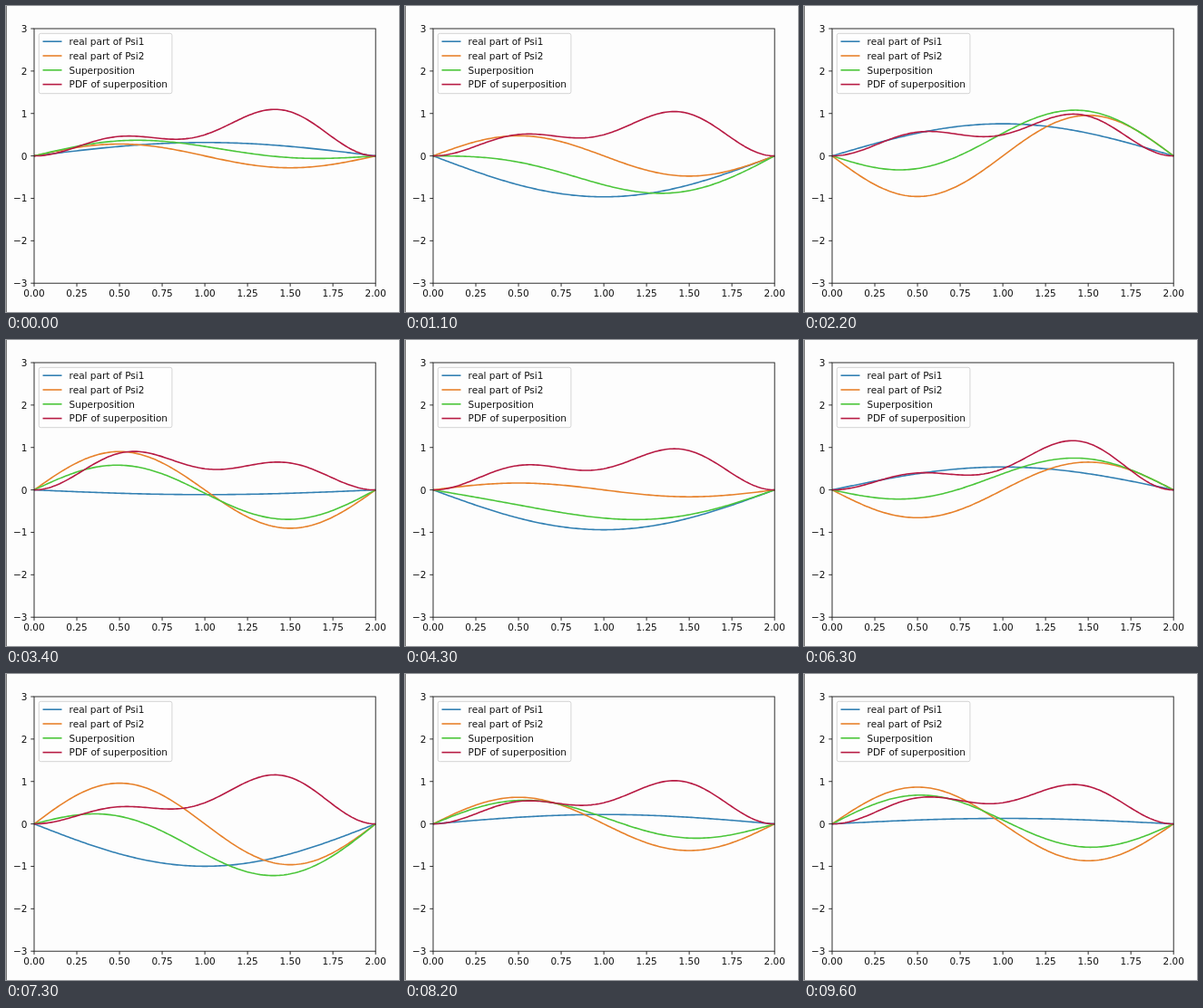
Write an HTML page that moves like this. It is 433 px wide and 338 px high and loops after 9.7 s.

```html
<!DOCTYPE html>
<html lang="en">
<head>
<meta charset="utf-8">
<title>Superposition in a box</title>
<style>
  html, body { margin: 0; width: 100%; height: 100%; overflow: hidden; background: #fdfdfd; }
  svg { display: block; width: 433px; height: 338px; }
  text { font: 10.5px "DejaVu Sans", sans-serif; fill: #111; }
  .curve { fill: none; stroke-width: 1.6; stroke-linejoin: round; }
  .axis { fill: none; stroke: #1a1a1a; stroke-width: 0.9; }
</style>
</head>
<body>
<svg id="stage" viewBox="0 0 433 338"></svg>
<script>
const LOOP = 9700, STEP = 100;
const LEFT = 31, RIGHT = 407.2, TOP = 25, BOTTOM = 306.2;
const stage = document.getElementById('stage');

const px = x => LEFT + x / 2 * (RIGHT - LEFT);
const py = y => BOTTOM - (y + 3) / 6 * (BOTTOM - TOP);

function add(tag, attrs, text) {
  const el = document.createElementNS('http://www.w3.org/2000/svg', tag);
  for (const key in attrs) el.setAttribute(key, attrs[key]);
  if (text) el.textContent = text;
  return stage.appendChild(el);
}

// Each wave gives its value from the two spatial modes and the ground-state phase.
const waves = [
  { label: 'real part of Psi1', color: '#3280b3',
    value: (s1, s2, p) => s1 * Math.cos(p) },
  { label: 'real part of Psi2', color: '#e7812a',
    value: (s1, s2, p) => s2 * Math.cos(4 * p) },
  { label: 'Superposition', color: '#4bc63a',
    value: (s1, s2, p) => (s1 * Math.cos(p) + s2 * Math.cos(4 * p)) / Math.SQRT2 },
  { label: 'PDF of superposition', color: '#b71a43',
    value: (s1, s2, p) => (s1 * s1 + s2 * s2 + s1 * s2 * Math.cos(3 * p)) / 2 }
];

add('rect', { x: 0, y: 0, width: 1, height: 338, fill: '#777' });
for (const w of waves) w.path = add('path', { class: 'curve', stroke: w.color });

// Axes
add('rect', { class: 'axis', x: LEFT, y: TOP, width: RIGHT - LEFT, height: BOTTOM - TOP });
for (let i = 0; i <= 8; i++) {
  const x = px(i / 4);
  add('path', { class: 'axis', d: `M${x} ${BOTTOM}v3.7` });
  add('text', { x, y: 321.3, 'text-anchor': 'middle' }, (i / 4).toFixed(2));
}
for (let v = -3; v <= 3; v++) {
  const y = py(v);
  add('path', { class: 'axis', d: `M${LEFT} ${y}h-3.7` });
  add('text', { x: 23.5, y: y + 3.9, 'text-anchor': 'end' }, String(v).replace('-', '\u2212'));
}

// Legend
add('rect', { x: 36.3, y: 30.3, width: 146.6, height: 66.4, rx: 2,
  fill: '#fefefe', stroke: '#d0d0d0', 'stroke-width': 0.9 });
waves.forEach((w, i) => {
  const y = 39.2 + i * 15.8;
  add('path', { class: 'curve', stroke: w.color, d: `M40.5 ${y}h21` });
  add('text', { x: 69.6, y: y + 3.8 }, w.label);
});

// Phase of the ground state at given steps; the pace is slightly uneven.
const phases = [[0, 1.249], [22, 5.572], [34, 7.965], [53, 11.79],
                [63, 13.566], [82, 17.502], [96, 20.29]];

function phaseAt(n) {
  let i = 1;
  while (i < phases.length - 1 && n > phases[i][0]) i++;
  const [n0, p0] = phases[i - 1], [n1, p1] = phases[i];
  return p0 + (p1 - p0) * (n - n0) / (n1 - n0);
}

function draw(phase) {
  for (const w of waves) {
    let d = '';
    for (let i = 0; i <= 160; i++) {
      const x = i / 80;
      const y = w.value(Math.sin(Math.PI * x / 2), Math.sin(Math.PI * x), phase);
      d += (i ? 'L' : 'M') + px(x).toFixed(2) + ' ' + py(y).toFixed(2);
    }
    w.path.setAttribute('d', d);
  }
}

const start = performance.now();
function tick() {
  const t = Math.max(0, performance.now() - start) % LOOP;
  draw(phaseAt(Math.floor(t / STEP)));
  requestAnimationFrame(tick);
}
tick();
</script>
</body>
</html>
```
